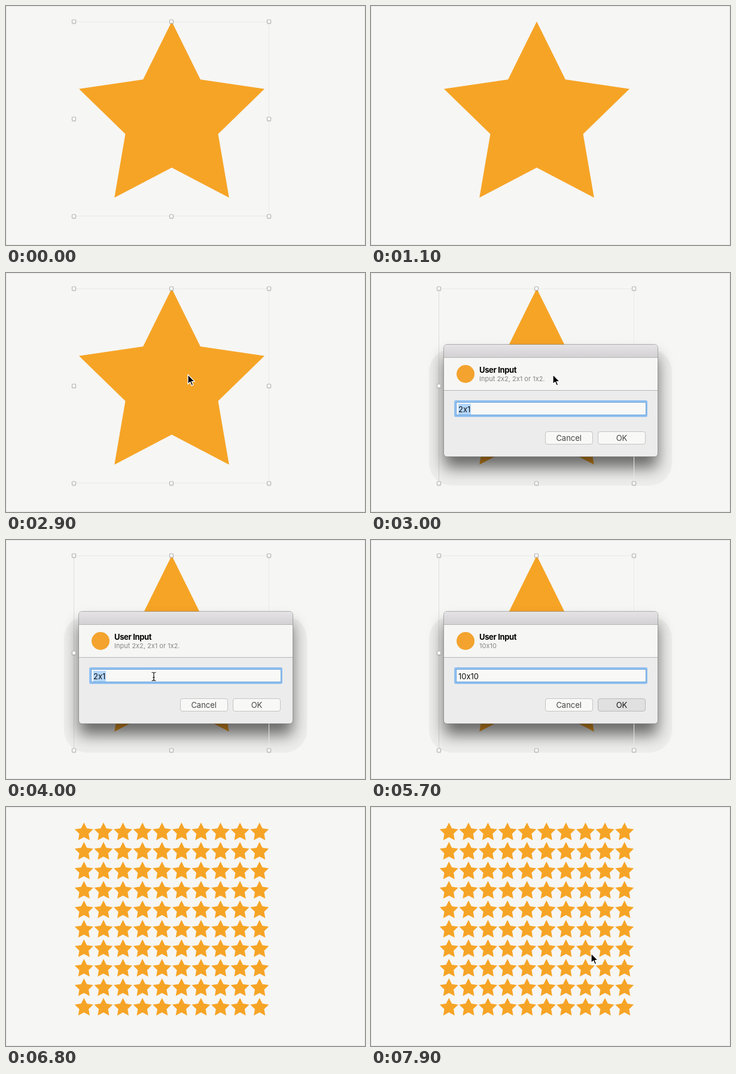
These frames come from a looping animation (600 by 400 pixels, 8 s). An HTML page:

```html
<!DOCTYPE html>
<html lang="en">
<head>
<meta charset="utf-8">
<title>Star grid</title>
<style>
html, body { margin: 0; width: 100%; height: 100%; overflow: hidden; background: #f6f6f4; }
svg { display: block; width: 600px; height: 400px; }
text { font-family: Inter, "Open Sans", sans-serif; font-size: 13px; font-variant-ligatures: no-contextual; white-space: pre; }
</style>
</head>
<body>
<svg viewBox="0 0 600 400">
  <defs>
    <linearGradient id="bar" x2="0" y2="1">
      <stop stop-color="#e5e3e5"/><stop offset="1" stop-color="#d2d0d2"/>
    </linearGradient>
    <filter id="blur" x="-30%" y="-40%" width="160%" height="180%"><feGaussianBlur stdDeviation="13"/></filter>
    <g id="handle">
      <rect x="-3.3" y="-2.4" width="6.8" height="6.8" rx="1.4" fill="#000" opacity=".1"/>
      <rect x="-3" y="-3" width="6" height="6" rx="1" fill="#fafafa" stroke="#b4b4b4" stroke-width="1.2"/>
    </g>
  </defs>
  <rect width="600" height="400" fill="#f6f6f4"/>
  <rect x=".5" y=".5" width="599" height="399" fill="none" stroke="#e6e6e5"/>
  <path id="stars" fill="#f6a426"/>
  <g id="shadow">
    <rect x="97" y="127" width="406" height="229" rx="38" opacity=".035"/>
    <rect x="122" y="139" width="357" height="187" rx="6" opacity=".56" filter="url(#blur)"/>
  </g>
  <g id="frame">
    <path d="M113.5 26.5H439.5V351.5H113.5" fill="none" stroke="#e9e9e7"/>
    <path id="side" d="M113.5 26V352" stroke="#000" stroke-opacity=".1"/>
  </g>
  <g id="dialog">
    <rect x="121.5" y="119.5" width="358" height="188" rx="5.5" fill="#ececec" stroke="#000" stroke-opacity=".27"/>
    <path d="M122 142V125a5 5 0 0 1 5-5H474a5 5 0 0 1 5 5V142Z" fill="url(#bar)"/>
    <rect x="122" y="142" width="357" height="54" fill="#f6f6f4"/>
    <path d="M122 141.5H479M122 196.5H479" stroke="#b7b6b7"/>
    <circle cx="158" cy="169" r="15" fill="#f3a32e"/>
    <text x="181" y="167" font-weight="700" letter-spacing="-.35">User Input</text>
    <text id="hint" x="181" y="181" style="font-size:11px" fill="#858585"></text>
    <rect x="139" y="213" width="323" height="28" rx="3" fill="#92c0f0"/>
    <rect x="142.5" y="216.5" width="317" height="21" fill="#f8f8f6" stroke="#69a3dc"/>
    <rect id="mark" x="146" y="219" width="21" height="18" fill="#b2d6fb"/>
    <text id="field" x="146" y="233" fill="#111"></text>
    <g stroke="#000" stroke-opacity=".19">
      <rect x="291.5" y="265.5" width="79" height="21" rx="3.5" fill="#f8f8f7"/>
      <rect id="ok" x="379.5" y="265.5" width="79" height="21" rx="3.5"/>
    </g>
    <text x="330.7" y="281" text-anchor="middle" fill="#454545">Cancel</text>
    <text id="okText" x="419" y="281" text-anchor="middle">OK</text>
  </g>
  <path id="arrow" d="M0 0V16L3.7 12.5L6.2 18.4L8.8 17.3L6.3 11.6H11.4Z" stroke="#fff" stroke-width="1.3" stroke-linejoin="round"/>
  <g id="beam" fill="none" stroke-linecap="round">
    <path d="M-3-6.5Q-.4-6.5 0-5Q.4-6.5 3-6.5M0-5V6M-3 7.5Q-.4 7.5 0 6Q.4 7.5 3 7.5M-1.5 2H1.5" stroke="#fff" stroke-width="2.4"/>
    <path d="M-3-6.5Q-.4-6.5 0-5Q.4-6.5 3-6.5M0-5V6M-3 7.5Q-.4 7.5 0 6Q.4 7.5 3 7.5M-1.5 2H1.5" stroke="#111" stroke-width="1.2"/>
  </g>
</svg>
<script>
const LOOP = 8000, STEP = 100;
const $ = id => document.getElementById(id);
const show = (id, on) => $(id).setAttribute('display', on ? 'inline' : 'none');

function star(cx, cy, r) {
  let d = '';
  for (let i = 0; i < 10; i++) {
    const a = i * Math.PI / 5, q = i % 2 ? r / 2 : r;
    d += (i ? 'L' : 'M') + (cx + q * Math.sin(a)).toFixed(2) + ' ' + (cy - q * Math.cos(a)).toFixed(2);
  }
  return d + 'Z';
}

function starGrid(n) {
  const cell = 326 / n;
  let d = '';
  for (let i = 0; i < n * n; i++)
    d += star(114 + cell * (i % n + .5), 26 + cell * (Math.floor(i / n) + .5), cell / 2);
  return d;
}

const single = starGrid(1), many = starGrid(10);

for (let i = 0; i < 9; i++) {
  if (i === 4) continue;
  const h = document.createElementNS('http://www.w3.org/2000/svg', 'use');
  h.setAttribute('href', '#handle');
  h.setAttribute('x', 113.5 + 163 * (i % 3));
  h.setAttribute('y', 26 + 163 * Math.floor(i / 3));
  $('frame').append(h);
}

// Pointer moves: start, end, from, to
const moves = [
  [1600, 2300, [330, -8], [304, 170]],
  [2300, 3400, [304, 170], [304, 170]],
  [3400, 4000, [304, 170], [247, 228]],
  [4000, 4700, [247, 228], [247, 228]],
  [7300, 7900, [247, 228], [368, 245]],
  [7900, 8000, [368, 245], [368, 245]]
];

function pointer(t) {
  const m = moves.find(([a, b]) => t >= a && t < b);
  if (!m) return null;
  const u = (t - m[0]) / (m[1] - m[0]), e = u * u * (3 - 2 * u);
  return m[2].map((v, i) => v + (m[3][i] - v) * e);
}

function typed(t) {
  if (t < 4700) return '2x1';
  const count = [4700, 4900, 5000, 5200, 5300].filter(k => t >= k).length;
  return '10x10'.slice(0, count);
}

function draw(t) {
  const open = t >= 3000 && t < 5800;
  const pressed = t >= 5600;
  $('stars').setAttribute('d', t < 5800 ? single : many);
  show('frame', t < 100 || t >= 2300 && t < 5800);
  show('side', open);
  show('shadow', open);
  show('dialog', open);
  show('mark', t < 4700);
  $('field').textContent = typed(t);
  $('hint').textContent = pressed ? '10x10' : 'Input 2x2, 2x1 or 1x2.';
  $('ok').setAttribute('fill', pressed ? '#e0e0e0' : '#f8f8f7');
  $('okText').setAttribute('fill', pressed ? '#151515' : '#454545');

  const p = pointer(t), text = open && p && p[1] > 214;
  show('arrow', p && !text);
  show('beam', text);
  if (p) $(text ? 'beam' : 'arrow').setAttribute('transform', `translate(${p[0]} ${p[1]})`);
}

const start = performance.now();
function tick() {
  const t = (performance.now() - start) % LOOP;
  draw(Math.floor(t / STEP) * STEP);
  requestAnimationFrame(tick);
}
tick();
</script>
</body>
</html>
```
